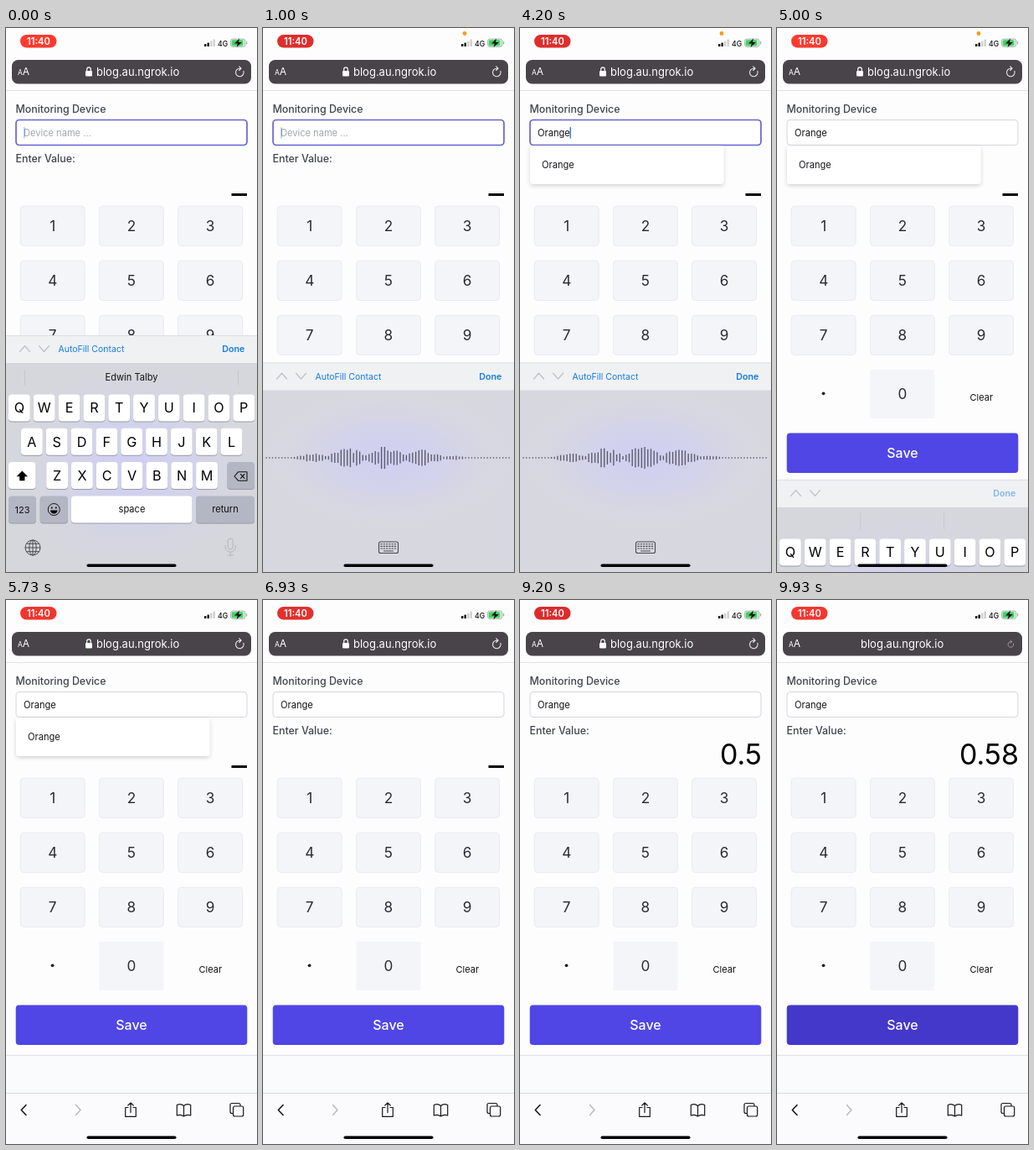
These frames come from a looping animation (300x648 px, 10000 ms). An HTML page:

```html
<!DOCTYPE html>
<html lang="en">
<head>
<meta charset="utf-8">
<title>Phone form with dictation</title>
<style>
html, body { margin: 0; width: 100%; height: 100%; overflow: hidden; background: #fdfdfe; }
svg { display: block; width: 100vw; height: 100vh; font-family: Inter, sans-serif; }
.line { fill: none; stroke-linecap: round; stroke-linejoin: round; }
</style>
</head>
<body>
<svg id="stage" viewBox="0 0 300 648"></svg>
<script>
const LOOP = 10000;
const rect = (x, y, w, h, r, fill, extra = '') =>
  `<rect x="${x}" y="${y}" width="${w}" height="${h}" rx="${r}" fill="${fill}" ${extra}/>`;
const text = (x, y, str, size, fill, anchor = 'middle', extra = '') =>
  `<text x="${x}" y="${y}" font-size="${size}" fill="${fill}" text-anchor="${anchor}" ${extra}>${str}</text>`;
const line = (d, stroke, width = 1.2, extra = '') =>
  `<path class="line" d="${d}" stroke="${stroke}" stroke-width="${width}" ${extra}/>`;
const group = (id, body) => `<g id="${id}">${body}</g>`;
const medium = 'font-weight="500"', semibold = 'font-weight="600"';

function statusBar() {
  const signal = [3, 4.5, 6.5, 8.5].map((h, i) =>
    rect(237 + i * 3.5, 22 - h, 2.4, h, .6, i < 2 ? '#111' : '#cfcfd3')).join('');
  return rect(17, 8, 43.5, 15.5, 7.75, '#ff3b30', 'id="pill"') +
    text(39, 19.6, '11:40', 11.2, '#fff', 'middle', semibold) + signal +
    text(253, 21.6, '4G', 8.7, '#111', 'start', medium) +
    rect(268.5, 13, 17.5, 9.4, 2.6, '#c9f0d1', 'stroke="#a9a9ae" stroke-width=".8"') +
    rect(269.8, 14.2, 13.5, 7, 1.5, '#45d264') + rect(287, 16, 1.2, 3.4, .6, '#a9a9ae') +
    '<path d="M279 12.6L273 18.4H276.8L275.6 23L282 16.9H278Z" fill="#111"/>' +
    '<circle id="micDot" cx="241" cy="6.5" r="2.4" fill="#f79a1e"/>';
}

function addressBar() {
  return rect(7, 38, 286, 28.5, 7.5, '#48444a') +
    text(14, 56.4, 'A', 8.4, '#fff', 'start') + text(19.8, 56.4, 'A', 12, '#fff', 'start') +
    group('lock', rect(95, 51, 8, 6.4, 1.2, '#fff') + line('M96.7 51V49.2a2.3 2.3 0 0 1 4.6 0V51', '#fff', 1.2)) +
    text(108, 56.6, 'blog.au.ngrok.io', 13, '#fff', 'start', 'id="address"') +
    group('reload', line('M4.4 -1.6A4.8 4.8 0 1 1 0 -4.8H1.3M-.8 -7.2L1.6 -4.8L-.8 -2.5', '#eee', 1.1)) +
    rect(0, 74, 300, 1, 0, '#e1e1e6');
}

function page() {
  let out = text(11.5, 100.6, 'Monitoring Device', 12.4, '#41444f', 'start', medium) +
    text(11.5, 159.6, 'Enter Value:', 12.4, '#41444f', 'start', medium) +
    rect(12, 109.5, 276, 30, 4, '#fff', 'id="field"') +
    text(21, 129, '', 11.1, '#111', 'start', 'id="fieldText"') +
    rect(21, 118, 1.5, 13.5, .5, '#3d7be2', 'id="caret"') +
    group('menu', rect(12, 140, 231.5, 46, 4, '#fff', 'filter="url(#shadow)"') +
      text(26, 167.2, 'Orange', 11.1, '#16161a', 'start')) +
    rect(269.5, 197, 18.5, 3, 0, '#000', 'id="underscore"') +
    text(289, 196, '', 34, '#000', 'end', 'id="value"');
  for (let i = 0; i < 9; i++) {
    const x = 17.2 + i % 3 * 94.2, y = 212.2 + Math.floor(i / 3) * 65;
    out += rect(x, y, 77, 47.3, 4, '#f4f5f9', 'stroke="#e6e8ee" stroke-width=".8"') +
      text(x + 38.5, y + 30, i + 1, 17.2, '#272a36');
  }
  return out + '<circle cx="55.5" cy="435.3" r="1.9" fill="#222"/>' +
    rect(111.4, 407, 77, 58, 0, '#f4f5f9') + text(150, 442.2, '0', 17.2, '#272a36') +
    text(244.3, 443.6, 'Clear', 11, '#111') +
    rect(11.7, 482.5, 276.6, 47.6, 4, '#4f46e5', 'id="save"') +
    text(150, 512.2, 'Save', 16, '#fff', 'middle', medium) +
    rect(0, 542, 300, 45, 0, '#fafbfd') + rect(0, 541.8, 300, 1, 0, '#dddee3');
}

function toolbar() {
  const ink = '#17171a';
  return rect(0, 587, 300, 61, 0, '#fbfafc') + rect(0, 587, 300, .8, 0, '#d2d2d7') +
    line('M24 601.5L18.3 607.5L24 613.5', ink, 1.6) + line('M83.5 601.5L89 607.5L83.5 613.5', '#b9b9be', 1.5) +
    line('M146 604.5H142.7V615.3H155.3V604.5H152M149 610.5V599M145.8 602L149 598.8L152.2 602', ink) +
    line('M212.5 602.5C210 600.3 206.5 600.6 204.3 601.5V614C207 613 210 613 212.5 615C215 613 218 613 220.7 614V601.5C218.5 600.6 215 600.3 212.5 602.5V615', ink) +
    rect(271.5, 603, 12.2, 12, 2, 'none', `stroke="${ink}" stroke-width="1.2"`) +
    line('M271 611.5H270Q268 611.5 268 609.5V601.5Q268 599.5 270 599.5H278Q280 599.5 280 601.5V602.5', ink);
}

// Accessory row drawn from y = 0
const accessory = id => rect(0, 0, 300, 33, 0, '#f0f1f3') + rect(0, 0, 300, .8, 0, '#d9dadf') +
  line('M16.5 19.5L22.5 12.8L28.5 19.5M39.5 12.8L45.5 19.5L51.5 12.8', '#bfc1c7', 1.3) +
  text(62.5, 20, 'AutoFill Contact', 10.5, '#147ce5', 'start', `class="${id}Fill"`) +
  text(285.3, 20, 'Done', 10.7, '#147ce5', 'end', `${semibold} class="${id}Done"`);

function keyboard() {
  const key = (x, y, w, fill = '#fff') => rect(x, y + 1, w, 32, 4, '#989aa3') + rect(x, y, w, 32, 4, fill);
  const gray = '#b3b7c3';
  const rows = ['QWERTYUIOP', 'ASDFGHJKL', 'ZXCVBNM'].map((letters, row) =>
    [...letters].map((c, i) => {
      const x = [3, 18, 48.2][row] + i * 29.82, y = 70.5 + row * 40.3;
      return key(x, y, 25.8) + text(x + 12.9, y + 21.8, c, 16.2, '#000');
    }).join('')).join('');
  return rect(0, 32, 300, 260, 0, '#d5d7dd') + rect(0, 32, 300, 250, 0, 'url(#glow)') +
    accessory('key') + rows +
    group('suggestion', text(150, 54, 'Edwin Talby', 11.1, '#111') +
      line('M22.5 42V59M277.5 42V59', '#c0c2ca', .8)) +
    group('dividers', line('M99.7 40V59M199.7 40V59', '#c0c2ca', .8)) +
    key(3, 151, 32.5) + '<path d="M19.3 161.5L26 168.3H22.4V173.2H16.2V168.3H12.6Z"/>' +
    key(264.5, 151, 32.5, gray) +
    line('M273 168L277.5 162.8H288V173.2H277.5ZM280.5 165.5L285 170.3M285 165.5L280.5 170.3', '#111', 1.1) +
    key(3, 191.5, 33, gray) + text(19.5, 211.5, '123', 11, '#111') +
    key(40.7, 191.5, 33.3, gray) +
    '<circle cx="57.3" cy="207.5" r="7" fill="none" stroke="#111"/><circle cx="54.8" cy="205.5" r="1"/><circle cx="59.8" cy="205.5" r="1"/><path d="M53 208.5H61.6A4.3 4 0 0 1 53 208.5Z"/>' +
    key(78, 191.5, 144.5) + text(150.5, 211.3, 'space', 11.1, '#111') +
    key(227, 191.5, 70, gray) + text(262, 211.3, 'return', 11.1, '#111') +
    '<g fill="none" stroke="#484a50"><circle cx="32" cy="253" r="9"/><ellipse cx="32" cy="253" rx="4.2" ry="9"/><path d="M23 253H41M32 244V262M24.5 248.3H39.5M24.5 257.7H39.5"/></g>' +
    rect(265.2, 242, 6, 13, 3, 'none', 'stroke="#b5b7bf"') +
    line('M262 250.5V252A6.2 6.2 0 0 0 274.4 252V250.5M268.2 258.5V262M264.8 262H271.6', '#b5b7bf', 1);
}

function dictation() {
  let dots = '';
  for (let i = 0; i < 18; i++) dots += `M${140.8 + i % 6 * 3.3} ${614.8 + Math.floor(i / 6) * 2.6}h1.4`;
  return rect(0, 430, 300, 218, 0, '#d7d8df') + rect(0, 430, 300, 165, 0, 'url(#glow)') +
    `<g transform="translate(0 398.5)">${accessory('talk')}</g>` +
    '<path id="wave" stroke="#5a5b68" stroke-width="1.35" fill="none"/>' +
    rect(138.5, 612, 23, 13.5, 2, 'none', 'stroke="#48494f" stroke-width="1.1"') +
    line(dots, '#48494f', 1.1) + line('M144.5 623h11', '#48494f', 1.1);
}

const stage = document.getElementById('stage');
stage.innerHTML = `<defs>
  <radialGradient id="glow"><stop offset="0" stop-color="#cfcef4"/><stop offset=".5" stop-color="#d1d1ee" stop-opacity=".7"/><stop offset="1" stop-color="#d7d8df" stop-opacity="0"/></radialGradient>
  <filter id="shadow" x="-10%" y="-30%" width="120%" height="170%"><feDropShadow dx="0" dy="2" stdDeviation="2.5" flood-opacity=".17"/></filter>
  </defs>` + rect(0, 0, 300, 648, 0, '#fdfdfe') + statusBar() + addressBar() + page() + toolbar() +
  group('talk', dictation()) + group('keys', keyboard()) + rect(96.5, 638.5, 107, 3.6, 1.8, '#000');

const $ = id => document.getElementById(id);
const clamp = v => Math.max(0, Math.min(1, v));
const ramp = (t, from, to) => clamp((t - from) / (to - from));
const attrs = (id, values) => { for (const k in values) $(id).setAttribute(k, values[k]); };
const show = (id, on) => attrs(id, { opacity: +on });

function wavePath(t) {
  let d = '';
  for (let i = 0; i < 79; i++) {
    const x = 4 + i * 3.72;
    const envelope = x > 34 && x < 242 ? Math.sin(Math.PI * (x - 34) / 208) : 0;
    const lobe = .18 + .82 * Math.abs(Math.sin(Math.PI * (x - 76) / 47));
    const jitter = .45 + .55 * Math.abs(Math.sin(i * 2.4 + t / 1000 * (3 + 2 * Math.sin(i * 5))));
    const half = .7 + 13 * envelope * lobe * jitter;
    d += `M${x.toFixed(1)} ${(512 - half).toFixed(1)}v${(2 * half).toFixed(1)}`;
  }
  return d;
}

function draw(t) {
  const pulse = .5 + .5 * Math.cos(t / 2600 * 2 * Math.PI);
  attrs('pill', { fill: `rgb(${217 + 38 * pulse},${44 + 15 * pulse},${43 + 5 * pulse})` });
  show('micDot', t > 650 && t < 5700);

  const toTalk = ramp(t, 500, 750), closing = t >= 4800;
  const slide = 1 - (1 - ramp(t, 4800, 5400)) ** 2;
  const offset = closing ? 33 + 249 * slide : 33 * toTalk;
  attrs('keys', { transform: `translate(0 ${366 + offset})`, opacity: closing ? +(slide < 1) : 1 - toTalk });
  show('talk', !closing && toTalk > 0);
  show('suggestion', !closing);
  show('dividers', closing);
  stage.querySelector('.keyFill').setAttribute('opacity', +!closing);
  stage.querySelector('.keyDone').setAttribute('opacity', closing ? .5 : 1);
  attrs('wave', { d: wavePath(t) });

  const typed = t >= 3500;
  $('fieldText').textContent = typed ? 'Orange' : 'Device name ...';
  attrs('fieldText', { fill: typed ? '#111' : '#a0a5b1' });
  attrs('field', closing ? { stroke: '#d3d6df', 'stroke-width': 1 } : { stroke: '#6663d2', 'stroke-width': 1.7 });
  attrs('caret', {
    x: typed ? 59.5 : 21,
    opacity: closing ? 0 : clamp(.5 + 1.2 * Math.sin(t / 1000 * 2 * Math.PI - .08))
  });
  show('menu', t >= 3700 && t < 6200);

  const value = t < 7800 ? '' : '0.58'.slice(0, 1 + (t >= 8350) + (t >= 8950) + (t >= 9350));
  $('value').textContent = value;
  show('underscore', !value);

  const loading = t >= 9750;
  attrs('save', { fill: t >= 9680 ? '#4338ca' : '#4f46e5' });
  show('lock', !loading);
  attrs('address', { x: loading ? 100 : 108 });
  attrs('reload', { transform: `translate(279.5 53) scale(${loading ? .68 : 1})`, opacity: loading ? .65 : 1 });
}

function tick() {
  draw(performance.now() % LOOP);
  requestAnimationFrame(tick);
}
tick();
</script>
</body>
</html>
```
